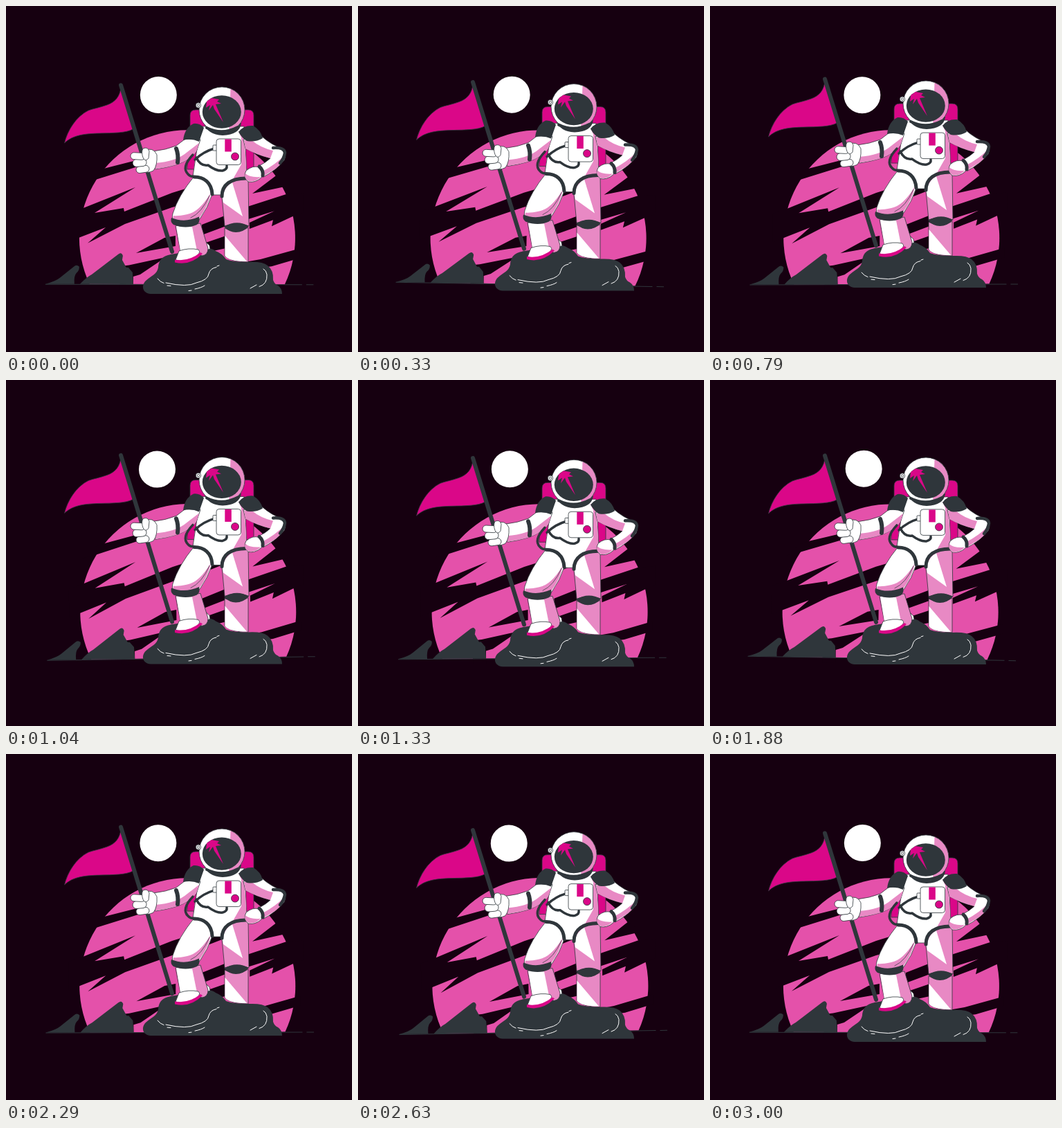
Write an HTML page that moves like this. It is 500 px wide and 500 px high and loops after 3.04 s.

```html
<!DOCTYPE html>
<html>
<head>
<meta charset="utf-8">
<title>Astronaut with flag</title>
<style>
html, body { margin: 0; width: 100%; height: 100%; overflow: hidden; background: #160010; }
svg { display: block; width: 100vw; height: 100vh; }
.bg { fill: #160010; }
.dark { fill: #2f363b; }
.white { fill: #fff; }
.planet { fill: #e451aa; }
.shade { fill: #e889c4; }
.hot { fill: #da0788; }
.edge { stroke: #2f363b; stroke-width: .8; stroke-linejoin: round; }
.band { fill: none; stroke: #2f363b; stroke-linecap: round; stroke-linejoin: round; }
.crack { fill: none; stroke: #fff; stroke-width: 1; stroke-linecap: round; }
</style>
</head>
<body>
<svg viewBox="0 0 500 500">
  <defs>
    <clipPath id="helmet"><circle cx="312" cy="150" r="33"/></clipPath>
  </defs>

  <g id="scene">
    <circle class="white" cx="220.2" cy="128.6" r="26.5"/>
    <path class="planet" d="M121 402A156 156 0 1 1 403 402Z"/>
    <g class="bg">
      <path d="M130 239L143 234.500L200 220L200 229L131 250.500L110 256Z"/>
      <path d="M90 300L111 292.500L187 262L128 299L170 292L171 297L240 270L318 246L318 266L284 279L240 291L172 315L118 343L144 320L90 341Z"/>
      <path d="M190 356L229 335L245 332V347L188 357Z"/>
      <path d="M165 376L178 374.500L231 363L194 388L184 391V410H165Z"/>
      <path d="M283 316L352 289L404 272L430 270V298L416 303L384 318L386 309L352 322V313L388 296L318 318L283 331Z"/>
      <path d="M356 271L390 245L410 258L402 261Z"/>
      <path d="M280 345L318 332V350L290 356ZM345 370L368 366L425 350V364L384 376L345 381Z"/>
    </g>
    <g class="dark">
      <path d="M57 402Q72 398 78 393L98 377Q102 373 106 377Q106 383 102 386Q98 390 99 402Z"/>
      <path d="M107 402Q116 392 124 388L162 359Q167 355 169 361L168 367L174 378H177L183 385L184 402Z"/>
    </g>
    <path class="band" style="stroke-linecap:butt" d="M57 402.500H428M434 402.500H444.500"/>
  </g>

  <g id="hero">
    <path class="dark" d="M209 416C197 415 195 404 202 397C211 389 218 388 220 378C221 364 229 360 244 358L289 351Q297 349 303 354Q313 358 318 366Q328 370 350 370Q371 369 378 375Q387 382 386 396Q388 402 393 404Q399 408 399 416Z"/>
    <path class="crack" d="M219 394Q223 399 228 400.500M233 404l5 .5M231 400Q262 407 275 400Q292 396 293 387Q295 379 304 377.500M305 376l3 -1M264 411.500l4 -.500M273 409Q283 407 287 404M353 408l9 -5M366 405.500Q378 402 377 388Q376 382 372 380"/>

    <!-- flag -->
    <path class="hot edge" d="M166 117C165 130 158 139 146 143C135 147 127 148 119 151C101 160 89 180 84.500 198C97 186 115 184.500 135 184C155 183.500 174 183.500 183.500 178Z"/>
    <path class="band" stroke-width="6" d="M166 114.500L240 355"/>

    <!-- backpack -->
    <path class="hot edge" d="M266 158Q266 150 274 150H350Q358 150 358 158V236H262V222L266 205Z"/>

    <!-- torso -->
    <path class="white edge" d="M284 174H344Q347 210 348 250L318 273H298Q284 252 270 246Q274 210 284 174Z"/>
    <path class="shade" d="M336 181H344L348 250H328L340 229V190Z"/>

    <!-- legs -->
    <path class="shade edge" d="M312 276C312 258 325 250 350 250L351 318Q333 311 316 318Z"/>
    <path class="white" d="M312.500 276Q316 261 327 255L342 304L314 284Z"/>
    <path class="shade edge" d="M316 321Q334 331 350 320V370Q325 370 316 361Z"/>
    <path class="white" d="M316.500 332L348 369Q322 369 316.500 361Z"/>
    <path class="dark" d="M315 319Q333 308 351 318Q343 327 332 327Q323 327 315 319Z"/>

    <path class="white edge" d="M290 342l4 4l1 5l-6 2z"/>
    <path class="shade edge" d="M245 318L252 354H272L283 361Q292 360 292 350L281 314Z"/>
    <path class="white" d="M246 318L252 354L276 354L269 319Z"/>
    <path class="white edge" d="M250 354Q264 349 278 352Q284 357 269 366Q255 370 245 367Z"/>
    <path class="hot" d="M244 366.500Q264 370 281 356L284 358Q266 376 244 370.500Z"/>
    <path class="white edge" d="M272 246Q249 274 241 300Q239 308 244 310Q262 317 280 308Q292 291 298 272C297 255 286 246 272 246Z"/>
    <path class="shade" d="M296 270Q279 298 262 301Q248 304 242 303Q240 309 247 311Q265 315 279 307Q292 290 296 270Z"/>
    <path class="band" stroke-width=".7" d="M294 274Q283 299 267 306"/>
    <path class="dark" d="M239 306Q258 314 279 304.500Q281 312 276 316Q260 323 242 316Q237 312 239 306Z"/>
    <path class="band" stroke-width="5" d="M272 247C286 247 297 255 298 272M312 275C312 258 325 249 347 249"/>

    <!-- far arm -->
    <path class="white edge" d="M343 193L369 188Q384 201 399 206Q407 213 402 223Q388 239 372 247L364 232Q376 226 382 220Q362 215 346 206Z"/>
    <path class="shade" d="M344 194L355 194Q368 205 386 209L382 220Q362 215 346 206ZM372 246L369 240Q390 229 403 215Q403 224 390 235Z"/>
    <path class="band" stroke-width="4.500" d="M386 205Q402 204 403 212Q402 220 396 227"/>
    <path class="white edge" d="M347 238Q356 230 366 233Q372 240 369 248Q360 256 350 254Q342 247 347 238Z"/>
    <path class="shade" d="M346 242Q351 248 368 247Q360 255 351 253.500Q343 249 346 242Z"/>
    <path class="band" stroke-width="5" d="M366 232Q372 237 371 245"/>

    <!-- near arm -->
    <path class="white edge" d="M259 192L246 202Q231 208 212 210L216 236Q249 231 262 222Q274 216 277 205L281 193Z"/>
    <path class="shade" d="M215 227Q246 225 262 211L279 198L277 205Q274 216 262 222Q249 231 216 235.500Z"/>
    <path class="band" stroke-width="6" d="M246 206Q249.500 215 248 226"/>
    <g class="white edge">
      <path d="M199 209Q213 203 218 215Q219 230 213 238Q203 243 196 238Z"/>
      <rect x="188" y="231" width="19" height="10" rx="5" transform="rotate(-8 197 236)"/>
      <rect x="183" y="221" width="20" height="11" rx="5.500" transform="rotate(-5 193 226)"/>
      <rect x="180" y="212" width="21" height="10" rx="5" transform="rotate(3 190 217)"/>
      <path d="M198 206Q205 203 207 210L206 220Q201 226 198 219Q195 211 198 206Z"/>
    </g>

    <!-- chest unit and hoses -->
    <path class="band" stroke-width="3.500" d="M301 206Q286 210 273 222M275 219Q281 232 292 230Q304 239 313 238Q320 236 319 231M270 215Q253 233 263 243Q267 247 270 246"/>
    <rect class="white edge" x="299" y="201" width="6" height="8" rx="1"/>
    <rect class="white edge" x="304" y="192" width="35.500" height="37.500" rx="4"/>
    <path class="hot" d="M316.300 192.500h9.500v18h-9.500z"/>
    <circle class="hot edge" cx="331" cy="217.500" r="5.500"/>

    <!-- shoulders -->
    <path class="dark" d="M256 194Q258 176 271 170Q280 169 286 176L279 196Q268 191 256 194ZM336 182Q343 172 357 173Q368 179 371 191Q361 197 348 195Q341 191 336 182Z"/>

    <!-- helmet -->
    <path class="dark" d="M286 169H340Q338 186 313 187Q291 186 286 169Z"/>
    <circle class="white" cx="312" cy="150" r="33"/>
    <path class="shade" clip-path="url(#helmet)" d="M324.700 115H350V185H322Z"/>
    <circle class="edge" fill="none" cx="312" cy="150" r="33"/>
    <path class="band" stroke-width="4" d="M290 176Q312 187 335 175"/>
    <ellipse class="dark" cx="311.800" cy="153" rx="28" ry="23.700"/>
    <path class="hot" d="M289 147L290 138L297 133L308 135L305 138L311 141L303 142L314 168L301 149L299 143L293 151L295 143Z"/>
    <circle class="white edge" cx="278" cy="143.500" r="3.700"/>
    <circle class="edge" fill="none" cx="278" cy="143.500" r="1.700"/>
  </g>
</svg>
<script>
const LOOP = 3040, CYCLE = 1500, LEAD = 20;
const scene = document.getElementById('scene');
const hero = document.getElementById('hero');

// Triangle wave: 0, 1, 0, -1 over one unit
const sway = p => p < .25 ? 4 * p : p < .75 ? 2 - 4 * p : 4 * p - 4;

function draw(now) {
  const p = (now % LOOP + LEAD) % CYCLE / CYCLE;
  const lift = 10 * (1 - Math.abs(2 * p - 1));
  scene.setAttribute('transform', `rotate(${sway(p)} 250 250)`);
  hero.setAttribute('transform', `translate(0 ${.27 - lift})`);
  requestAnimationFrame(draw);
}
draw(0);
</script>
</body>
</html>
```
